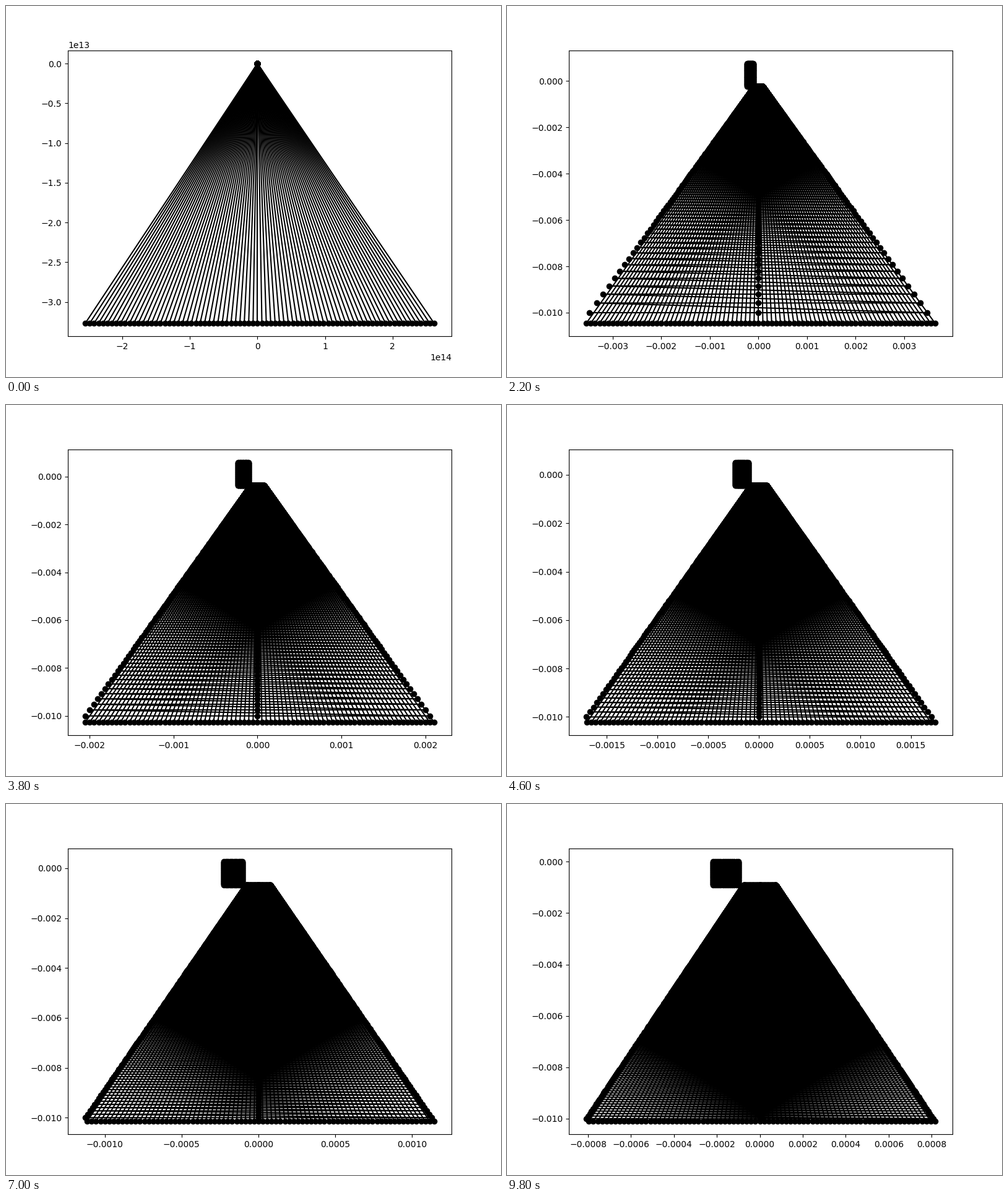
Write a matplotlib script that moves like this. It is 800 px wide and 600 px high and loops after 10000 ms.

```python
import math

import numpy as np
import matplotlib.pyplot as plt
from matplotlib.animation import FuncAnimation

FRAMES = 50
INTERVAL = 200
FOCAL = 0.01          # focal length of the pinhole camera
HALF_ROAD = 40
DEPTH = 5000          # distance from the near edge to the far edge
STEP = 5              # spacing of the cross rows
TINY = 25 * math.cos(math.pi / 2)   # keeps the near edge off zero depth

fig, ax = plt.subplots(figsize=(8, 6), dpi=100)

# Lengthwise lines, one for each unit of road width
lanes = np.arange(-HALF_ROAD + 1, HALF_ROAD + 1)
rails = [ax.plot([], [], "ko-")[0] for _ in lanes]

# Cross rows: left, middle, right, then on to the next row
row_z = np.arange(STEP, DEPTH + STEP, STEP)
cross_x = np.tile([-HALF_ROAD, 0, HALF_ROAD], len(row_z))
cross_z = np.repeat(row_z, 3)
cross, = ax.plot([], [], "ko-")

# Tower standing at the far end
tower_x, tower_y = (a.ravel() for a in np.meshgrid(
    np.arange(-120, -54, 5), np.arange(0, 501, 10)))
tower, = ax.plot([], [], "ko")


def project(x, y, z):
    return FOCAL * x / z, FOCAL * y / z


def draw(i):
    shift = 10 * i
    ground = -5 - shift
    near = shift + TINY
    far = shift + DEPTH

    ends = np.array([near, far])
    for x, rail in zip(lanes, rails):
        rail.set_data(*project(x, ground, ends))
    cross.set_data(*project(cross_x, ground, cross_z + shift))
    tower.set_data(*project(tower_x, tower_y + ground, far))

    ax.relim()
    ax.autoscale_view()
    return [*rails, cross, tower]


def reset():
    return draw(0)


anim = FuncAnimation(fig, draw, frames=FRAMES, init_func=reset,
                     interval=INTERVAL, repeat=True, repeat_delay=0,
                     blit=False)
plt.show()
```
